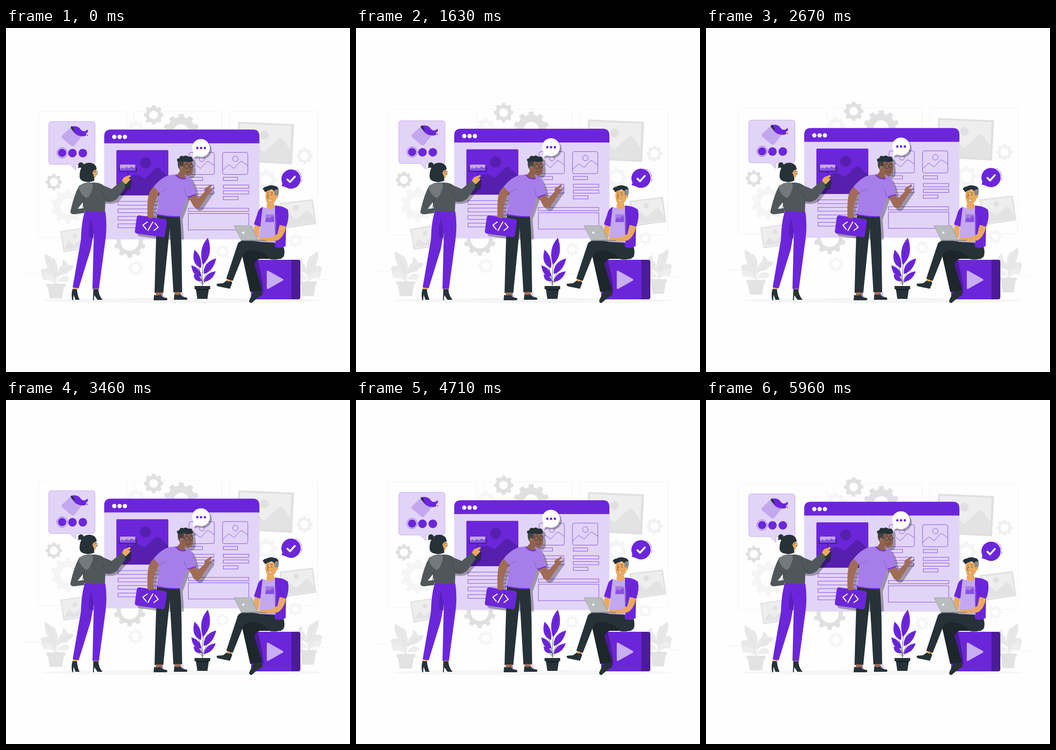
An HTML page that plays this animation: 748 by 748 pixels, repeating every 6 s.

```html
<!DOCTYPE html>
<html lang="en">
<head>
<meta charset="utf-8">
<title>Website builders</title>
<style>
  html, body { margin: 0; width: 100%; height: 100%; overflow: hidden; background: #fefefe; }
  svg { display: block; width: 100vw; height: 100vh; }
  .main { fill: #6c26da; }
  .tint { fill: #e2d4f7; }
  .mid { fill: #a77de9; }
  .soft { fill: #c4a8ee; }
  .deep { fill: #561fae; }
  .ink { fill: #263238; }
  .brown { fill: #a06c57; }
  .skin { fill: #e9a95f; }
  .white { fill: #fff; }
  .line { fill: none; stroke: #6c26da; stroke-width: .8; }
  .thin { fill: none; stroke: #263238; stroke-width: .8; }
  .mark { fill: none; stroke: #fff; stroke-linecap: round; stroke-linejoin: round; }
  .shade { filter: brightness(0) opacity(.3); }
  .pale { fill: #eee; }
  .grey { fill: #e0e0e0; }
  .hill { fill: #e3e3e3; }
</style>
</head>
<body>
<svg viewBox="0 0 748 748">
  <defs>
    <clipPath id="page"><path d="M213.5 221H551V460H213.5Z"/></clipPath>
    <g id="card" class="line">
      <rect width="55" height="48" rx="4"/>
      <circle cx="28" cy="14" r="6"/>
      <path d="M0 39L12 28Q14 26 16 28L25 35 38 21Q41 18 44 21L55 29"/>
    </g>
    <path id="talk" d="M407 271Q401 254 412 246A19.500 19.500 0 1 1 415 279Q411 281 405 282Q408 278 407 271Z"/>
    <g id="shrub">
      <path fill="#e8e8e8" d="M110 541Q82 522 84 491Q95 494 100 501L104 500Q116 516 111 541ZM111 541Q113 520 122 516L124 503Q132 507 134 515L147 516Q145 527 137 528Q133 537 120 536ZM109 554Q97 539 77 542Q80 533 75 529Q79 520 89 523L91 519Q109 531 109 554Z"/>
      <path fill="#eee" d="M111 552Q116 541 127 539Q135 538 138 546Q133 555 120 552ZM80 536Q96 530 108 549L109 558Q98 546 80 549Z"/>
      <path fill="none" stroke="#ddd" d="M88 497Q108 526 110 558M144 518Q119 527 109 548"/>
      <path fill="#e3e3e3" d="M88 556H129V563H88ZM91 563H126L122 588H95Z"/>
    </g>

    <g id="woman">
      <path class="ink" d="M145 567L154 566Q155 581 160 591H151L147 580 146 592H144Q141 578 145 567ZM190 567H201Q201 581 210 591H199L192 581 191 592H189Z"/>
      <path class="skin" d="M146 561H158L155 568H146ZM190 562H202L200 568H191Z"/>
      <path class="main" d="M172 397L216 399Q220 425 217 455L202 567H188L191 445 184 482 158 566 145 564Q155 505 163 460Q164 420 172 397Z"/>
      <path fill="#5a1fb9" d="M185 414Q178 434 181 455L190 457Q191 440 188 430Z"/>
      <path fill="#50575a" d="M159 343Q172 335 188 336Q204 335 213 343L230 350 254 330 262 343 242 371Q230 381 216 377L215 400 170 398 172 402 149 405Q137 405 141 395 148 363 159 343Z"/>
      <path fill="#fefefe" d="M167 379L156 393 169 392Z"/>
      <path fill="#74797b" d="M158 347Q165 334 187 336Q191 345 186 354Q181 370 174 369Q162 362 158 347Z"/>
      <path fill="none" stroke="#3c4346" d="M209 354Q211 371 224 375M170 370L166 396"/>
      <path class="skin" d="M187 306L196 307 197 314 199 319 196 320Q196 327 187 328Z"/>
      <circle class="ink" cx="163" cy="298" r="6"/>
      <path class="ink" d="M163 306Q168 292 183 293Q197 295 197 308Q189 308 188 316Q192 321 192 332Q181 337 172 334Q160 332 160 322Q160 312 163 306ZM164 302L156 305 158 300Z"/>
      <path class="thin" d="M191 314Q198 308 199 314L197 318 195 316"/>
      <path class="ink" d="M261 325Q266 318 270 326L270 346Q267 350 262 348L258 343Z"/>
      <path class="thin" style="stroke-width: 1.4" d="M265 322V312H246V304H249M265 312H284V304H281"/>
      <rect class="soft" x="248" y="297" width="33" height="13"/>
      <path class="main" opacity=".65" d="M248 307L253 303 257 306 262 302 267 305 273 301 277 304 281 303V310H248Z"/>
      <path class="skin" d="M252 332L256 325Q263 322 268 320Q272 320 271 323L266 327 270 327 270 330Q264 337 260 340Z"/>
    </g>

    <g id="man">
      <path class="ink" d="M328 407L378 410Q382 450 382 510L383 575H364L356 435 342 576H323Q325 500 328 407Z"/>
      <path class="brown" d="M326 575H339L341 583H325ZM367 574H379L381 582H366Z"/>
      <path class="ink" d="M322 580Q327 583 337 580Q341 587 350 587Q352 592 348 592H321ZM366 579Q371 582 380 579Q384 586 393 586Q396 591 392 591H365Z"/>
      <path fill="none" stroke="#a77de9" d="M336 583L341 577 340 585 344 583M379 582L385 576 383 584 387 582"/>
      <path class="brown" d="M325 342L333 357Q321 380 320 399L321 412H308Q306 376 311 360Q315 349 325 342ZM396 366L412 361 417 371 432 356Q430 348 437 346L446 340Q449 341 447 344L441 350 446 349Q448 351 446 354L440 362 422 389Q415 395 408 388Z"/>
      <path class="mid" d="M371 318L399 324Q408 334 413 361L393 368Q387 388 378 411Q350 412 326 406Q334 377 333 358L321 345Q337 325 355 320Z"/>
      <path fill="none" stroke="#6c26da" stroke-width="2" d="M395 368L413 362M326 405Q350 411 378 410"/>
      <path fill="none" stroke="#8157c4" d="M333 360Q339 354 349 350M393 368Q391 358 387 350"/>
      <path fill="#8f6250" d="M374 290H404Q408 300 406 313Q402 323 394 321L388 318 391 327Q379 332 371 320L378 312Z"/>
      <path fill="none" stroke="#6c26da" stroke-width="2" d="M369 319Q378 331 391 327"/>
      <path fill="#454242" d="M374 289H387L386 298 382 304 376 306Q372 298 374 289Z"/>
      <path class="ink" d="M374 291Q368 285 377 283 378 276 386 279 391 275 397 280 405 278 406 285 409 291 401 291 393 293 387 290Z"/>
      <circle class="brown" cx="381" cy="303" r="3.500"/>
      <g class="thin">
        <circle cx="393" cy="301" r="4.700"/><circle cx="402" cy="300" r="4"/>
        <path d="M382 300L389 300M390 296L395 294M400 294L405 295M399 303L402 307 399 309M391 312Q397 316 402 311"/>
      </g>
      <g transform="rotate(8 314 431)">
        <rect class="main" x="282" y="411" width="66" height="40" rx="5"/>
        <path class="mark" stroke-width="2.200" d="M306 423L297.500 431 306 439M323 423L331 431 323 439M318 421L310 441"/>
      </g>
      <path class="brown" d="M307 403L320 402 321 412 315 414 309 413Z"/>
    </g>
  </defs>

  <g id="back">
    <g fill="none" stroke="#f0f0f0">
      <rect x="70.500" y="181.500" width="192" height="274" rx="6"/>
      <rect x="278" y="181.500" width="192" height="274" rx="6"/>
      <rect x="486" y="181.500" width="192" height="274" rx="6"/>
      <path d="M41 534H78M452 541H510M674 546.500H707"/>
    </g>
    <g id="gears" fill-rule="evenodd"></g>
    <path class="grey" d="M505 204L626.500 209 622 296.500 500 290Z"/>
    <path class="pale" d="M509 208L621 213 617 291 505 285Z"/>
    <circle class="grey" cx="562" cy="233" r="9.500"/>
    <path class="hill" d="M505 277L529 250Q534 246 540 251L561 270 591 243Q598 236 604 244L619 267 617 291 505 285Z"/>
    <path class="pale" stroke="#e0e0e0" stroke-width="2.500" d="M119.500 443L165 436 172 479 126 486Z"/>
    <circle class="grey" cx="150" cy="452" r="5"/>
    <path class="hill" d="M126 481L137 463 149 473 162 460 172 473 171 476Z"/>
    <path class="pale" stroke="#e0e0e0" stroke-width="3" d="M596 382L666 374 673 425 604 435Z"/>
    <circle class="grey" cx="631" cy="391" r="6"/>
    <path class="hill" d="M602 422L617 405 631 416 652 398Q656 395 660 400L671 417 670 423 604 432Z"/>
    <use href="#shrub"/>
    <use href="#shrub" transform="matrix(-.9 0 0 1 755 -5)"/>
  </g>

  <ellipse cx="384" cy="592.500" rx="304" ry="5.500" fill="#f5f5f5"/>

  <g class="float">
    <path class="tint" d="M213.500 250H551V450Q551 460 541 460H223.500Q213.500 460 213.500 450Z"/>
    <path class="main" d="M213.500 251.300V236Q213.500 221.300 228 221.300H537Q551 221.300 551 236V251.300Z"/>
    <g class="white"><circle cx="235.500" cy="237.300" r="4.700"/><circle cx="247" cy="237.300" r="4.700"/><circle cx="258.500" cy="237.300" r="4.700"/></g>
    <rect class="main" x="240" y="266" width="113" height="98.500" rx="2"/>
    <circle class="deep" cx="303.500" cy="293.500" r="12"/>
    <path class="deep" d="M240 354L263 330Q276 317 287 320L302 328 323 307Q329 301 335 307L353 324V364.500H240Z"/>
    <use href="#card" x="398" y="271"/>
    <use href="#card" x="470.800" y="271"/>
    <g id="fields" class="line"></g>
  </g>

  <g clip-path="url(#page)">
    <use href="#man" class="shade" transform="translate(6 6)"/>
    <path opacity=".3" d="M213 376Q232 379 242 371L262 343 270 328 273 332 271 350 266 352 247 375Q236 386 213 381Z"/>
  </g>

  <g class="float">
    <path class="tint" stroke="#c4a8ee" d="M99 204H187Q193.500 204 193.500 210V291Q193.500 297 187 297H152V309.500L139 297H99Q93 297 93 291V210Q93 204 99 204Z"/>
    <path class="soft" d="M141 216L165 236 148 257Q145 259 141 256L122 240Q119 237 122 234Z"/>
    <path class="main" d="M141 215Q153 212 160 218Q166 228 174 224Q177 220 178 223Q179 228 174 229Q177 236 167 236Q155 236 148 228Q143 222 141 215Z"/>
    <path class="ink" d="M141 215Q145 214 147 219L150 226Q143 223 141 218Z"/>
    <circle class="main" cx="177" cy="233.500" r="1.200"/>
    <g class="main"><circle cx="122" cy="272" r="9"/><circle cx="144.500" cy="272.500" r="9.300"/><circle cx="167" cy="272.500" r="9.300"/></g>
    <circle class="line" cx="122" cy="272" r="11.300"/>

    <use href="#talk" class="shade" transform="translate(4 4)"/>
    <use href="#talk" class="white"/>
    <g class="main"><circle cx="416" cy="261.500" r="2.600"/><circle cx="424.200" cy="261.500" r="2.600"/><circle cx="432.400" cy="261.500" r="2.600"/></g>

    <path class="main" d="M599 344Q602 340 600 336A21 21 0 1 1 609 347Q605 345 599 344Z"/>
    <path class="mark" stroke-width="4" d="M612 330L617.500 335.500 628 324"/>
    <path class="line" stroke-dasharray="22 3 7 3 2 20" d="M631 308.500A24 24 0 0 1 642 337"/>
  </g>

  <use href="#woman"/>
  <use href="#man"/>

  <g>
    <path class="thin" d="M427 562Q425 525 435 478M427 552Q420 520 411 490M427 555Q420 533 405 520M427 555Q438 525 453 505M427 558Q438 543 453 532M427 558L411 540"/>
    <path class="main" d="M428 515Q417 480 439 456Q452 493 428 515ZM424 522Q401 513 410 482Q428 498 424 522ZM430 535Q428 509 457 501Q451 529 430 535ZM425 540Q406 542 403 516Q423 522 425 540ZM426 550Q409 553 408 536Q421 537 426 550ZM430 552Q433 532 456 529Q449 550 430 552Z"/>
    <path fill="none" stroke="#4c1b99" stroke-width=".7" d="M428 514L437 468M423 520L411 490M431 534L453 505M424 539L406 520M431 551L453 532"/>
    <path class="ink" d="M410 561H444V568H441L438 589H416L413 568H410Z"/>
    <path d="M413 568H441V570H413Z" fill="#10181c"/>
  </g>

  <g>
    <rect class="main" x="533" y="504" width="107" height="86" rx="5"/>
    <path fill="#4c1b99" d="M620.500 504H635Q640 504 640 509V585Q640 590 635 590H620.500ZM538 504H547Q557 540 560 572L556 582 545 584Z"/>
    <path fill="#c9aef2" stroke="#c9aef2" stroke-width="4" stroke-linejoin="round" d="M569 529.500L601 547.500 569 565.500Z"/>

    <path class="skin" d="M481 543L492 548 488 552 480 552Z"/>
    <path class="ink" d="M480 549Q484 553 489 550L492 554 487 567 462 562Q456 560 459 556L472 555ZM539 571H554L557 575 556 581Q546 587 534 598Q528 598 529 592Z"/>
    <path fill="#1d262b" d="M600 502L562 483Q530 478 512 488L531 574 557 570 540 514Q542 505 552 502Z"/>
    <path class="ink" d="M504 469Q509 461 520 462L598 467Q609 480 604 497Q596 505 575 503Q560 483 530 483Q518 485 514 497L493 550 479 545Z"/>

    <path class="skin" d="M542 426L553 428 549 457 538 459 536 448Z"/>
    <path class="main" d="M558 389Q549 392 546 406L539 427 553 432 560 420ZM585 386Q604 387 613 395Q617 412 609 433L608 474Q596 481 585 476L580 430Z"/>
    <path class="soft" d="M558 389Q572 395 585 386Q588 420 586 467L549 465 553 432Z"/>
    <path class="mid" d="M564 405H583V422H564Z"/>
    <path class="main" opacity=".5" d="M564 417L569 411 573 415 579 408 583 412V422H564Z"/>
    <path fill="none" stroke="#561fae" d="M586 388Q584 425 587 466M596 407V430"/>
    <path class="skin" d="M595 428L609 432Q604 455 590 462L562 464 546 463Q547 458 555 456L577 455 590 448Z"/>
    <path fill="#a8abae" d="M495 429H531Q534 429 535 431L549 462H511Z"/>
    <path fill="#b9bcbe" d="M498 430H531L546 460 511 461Z"/>
    <path fill="#858a8e" d="M511 461H566V463H511Z"/>
    <circle class="white" cx="516" cy="445" r="2.400"/>

    <path class="skin" d="M565 353H588Q591 363 586 376L582 381 585 388Q575 399 566 389L568 381Q565 376 564 366Z"/>
    <path fill="#8b8b8b" d="M583 350L593 349Q594 362 590 368L586 369 584 361Z"/>
    <path class="ink" d="M563 357Q561 351 558 351Q560 345 566 345Q574 340 583 343 592 344 592 351Q584 350 584 355L578 351Q569 353 563 357Z"/>
    <circle class="skin" cx="588" cy="367" r="3.500"/>
    <path class="thin" d="M568 359L571 358M575 358L580 359M571 363L568 369 571 370"/>
    <circle class="ink" cx="570" cy="363" r="1.100"/><circle class="ink" cx="578" cy="363" r="1.100"/>
    <path class="white" stroke="#7a3f2b" stroke-width=".5" d="M571 373Q575 374 578 372Q577 377 573 377Z"/>
  </g>
</svg>
<script>
const find = id => document.getElementById(id);

// Toothed ring: centre, outer radius, hole radius, colour, teeth
function gear(x, y, R, hole, color, teeth = 8) {
  const points = [], root = R * .82, step = 2 * Math.PI / teeth;
  for (let i = 0; i < teeth; i++) {
    for (const [r, a] of [[root, -.28], [R, -.21], [R, .21], [root, .28]]) {
      const angle = (i + a) * step;
      points.push((x + r * Math.sin(angle)).toFixed(1) + ' ' + (y - r * Math.cos(angle)).toFixed(1));
    }
  }
  const ring = `M${x - hole} ${y}a${hole} ${hole} 0 1 0 ${2 * hole} 0a${hole} ${hole} 0 1 0 ${-2 * hole} 0Z`;
  return `<path fill="${color}" d="M${points.join('L')}Z${ring}"/>`;
}

const grey = '#e0e0e0', pale = '#f5f5f5';
find('gears').innerHTML =
  gear(321, 189, 21.5, 9.5, grey) + gear(381, 225, 38.5, 16, grey, 10) +
  gear(283, 221, 20, 9, pale) + gear(649, 278, 17.5, 9, '#f0f0f0') +
  gear(566, 331, 24, 11, pale) + gear(104, 335, 18, 9, grey) +
  gear(135, 388, 38, 17, pale, 10) + gear(269, 465, 35, 19.5, grey, 10) +
  gear(282, 522, 16.5, 8.5, pale) + gear(470, 486, 14.5, 7, pale) +
  gear(629, 462, 14.5, 7, pale);

const field = (x, y, w, h) => `<rect x="${x}" y="${y}" width="${w}" height="${h}"/>`;
let fields = field(396.5, 392.5, 131.5, 7) + field(396.5, 404, 131.5, 35.5);
for (let i = 0; i < 4; i++) fields += field(243.5, 377.6 + i * 16.3, 110, 8.2);
for (const x of [396.5, 472.5]) {
  fields += field(x, 325, 31, 7) + field(x, 342, 55.5, 7) +
    field(x, 354.5, 55.5, 7) + field(x, 367, 32, 7);
}
find('fields').innerHTML = fields;

// Linear rise and fall, 0 to 1 to 0
const wave = (t, period) => 1 - Math.abs(1 - 2 * ((t / period) % 1));
const floats = document.querySelectorAll('.float');
const shift = (el, y) => el.setAttribute('transform', `translate(0 ${y.toFixed(2)})`);
const start = performance.now();

function draw() {
  const t = (performance.now() - start) % 6000 + 40;
  shift(find('back'), -9 * wave(t, 6000));
  floats.forEach(el => shift(el, -10 * wave(t, 1500)));
  requestAnimationFrame(draw);
}
draw();
</script>
</body>
</html>
```
